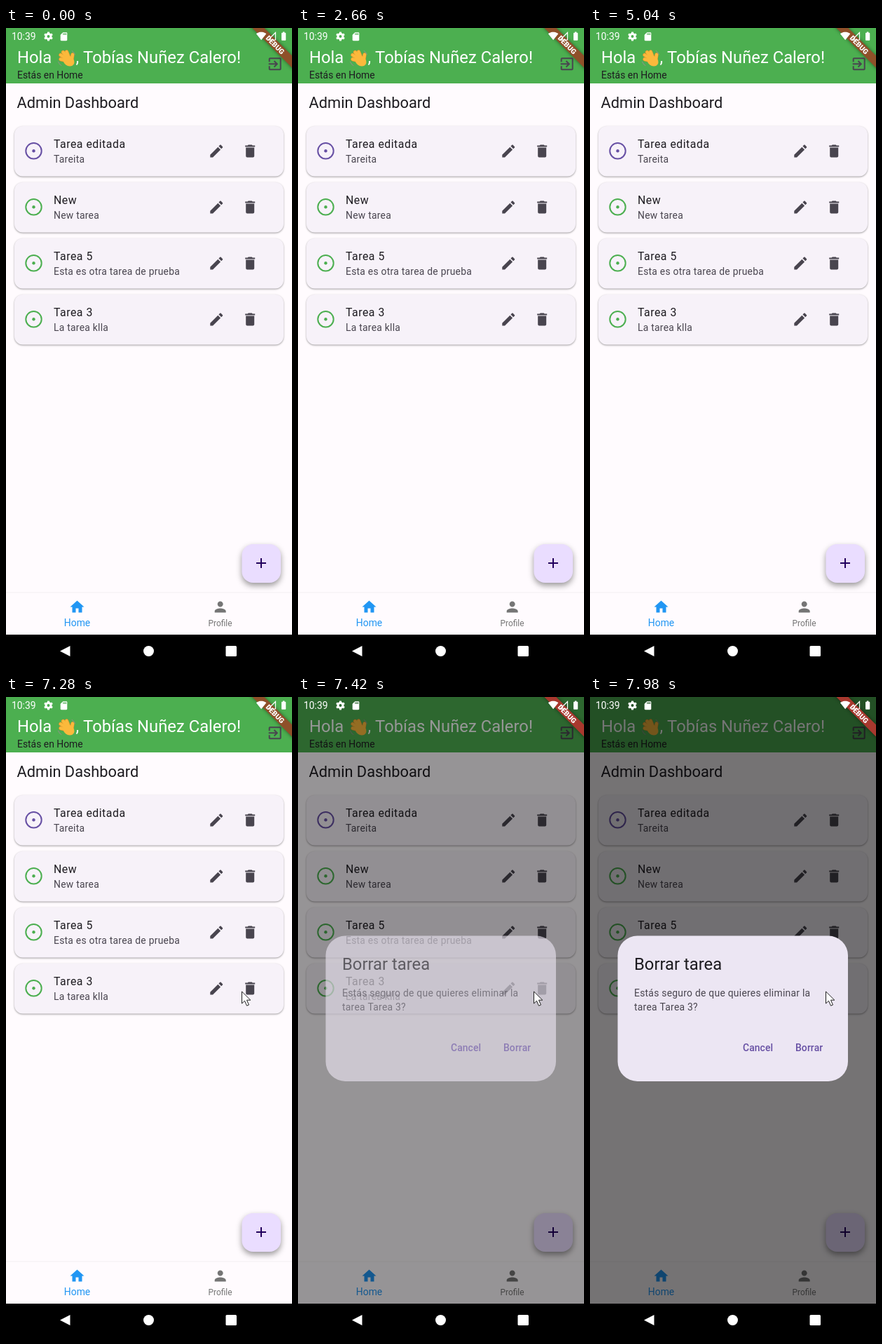
An HTML page with a canvas that plays this animation: 408x914 px, repeating every 8000 ms.

```html
<!DOCTYPE html>
<html lang="es">
<head>
<meta charset="utf-8">
<title>Admin Dashboard</title>
<style>
html, body { margin: 0; width: 100%; height: 100%; overflow: hidden; background: #fffbfe; }
canvas { display: block; width: 408px; height: 914px; }
</style>
</head>
<body>
<canvas id="stage"></canvas>
<script>
const W = 408, H = 914, LOOP = 8000;
const canvas = document.getElementById('stage');
const ctx = canvas.getContext('2d');
const ratio = window.devicePixelRatio || 1;
canvas.width = W * ratio;
canvas.height = H * ratio;

const COLOR = {
  page: '#fffbfe', card: '#f7f2f9', header: '#4caf50', fab: '#eaddff', dialog: '#ece6f3',
  ink: '#1d1b20', soft: '#49454f', purple: '#6750a4', green: '#4caf50', blue: '#2196f3',
  muted: '#757575', white: '#ffffff'
};

const ICON = {
  edit: 'M3 17.25V21h3.75L17.81 9.94l-3.75-3.75L3 17.25zM20.71 7.04c.39-.39.39-1.02 0-1.41l-2.34-2.34c-.39-.39-1.02-.39-1.41 0l-1.83 1.83 3.75 3.75 1.83-1.83z',
  trash: 'M6 19c0 1.1.9 2 2 2h8c1.1 0 2-.9 2-2V7H6v12zM19 4h-3.5l-1-1h-5l-1 1H5v2h14V4z',
  exit: 'M10.09 15.59L11.5 17l5-5-5-5-1.41 1.41L12.67 11H3v2h9.67l-2.58 2.59zM19 3H5c-1.11 0-2 .9-2 2v4h2V5h14v14H5v-4H3v4c0 1.1.89 2 2 2h14c1.1 0 2-.9 2-2V5c0-1.1-.9-2-2-2z',
  home: 'M10 20v-6h4v6h5v-8h3L12 3 2 12h3v8z',
  person: 'M12 12c2.21 0 4-1.79 4-4s-1.79-4-4-4-4 1.79-4 4 1.79 4 4 4zm0 2c-2.67 0-8 1.34-8 4v2h16v-2c0-2.66-5.33-4-8-4z',
  plus: 'M19 13h-6v6h-2v-6H5v-2h6V5h2v6h6v2z',
  card: 'M18 2h-8L4 8v12c0 1.1.9 2 2 2h12c1.1 0 2-.9 2-2V4c0-1.1-.9-2-2-2zM12 8h-2V4h2v4zm3 0h-2V4h2v4zm3 0h-2V4h2v4z',
  wifi: 'M12 21.5L23.6 7C23.2 6.7 18.7 3 12 3S.8 6.7.4 7L12 21.5z',
  battery: 'M15.7 4H14V2h-4v2H8.3C7.6 4 7 4.6 7 5.3v15.4c0 .7.6 1.3 1.3 1.3h7.4c.7 0 1.3-.6 1.3-1.3V5.3c0-.7-.6-1.3-1.3-1.3z',
  pointer: 'M0 0V17L4 13.3L7 20.2L10 19L7 12.2H12.3Z'
};
for (const name in ICON) ICON[name] = new Path2D(ICON[name]);

const TASKS = [
  ['Tarea editada', 'Tareita', COLOR.purple],
  ['New', 'New tarea', COLOR.green],
  ['Tarea 5', 'Esta es otra tarea de prueba', COLOR.green],
  ['Tarea 3', 'La tarea klla', COLOR.green]
];

// Steps of the dialog opening: start time, scrim and dialog opacity
const STEPS = [
  { at: 7350, scrim: .17, alpha: .25 },
  { at: 7420, scrim: .41, alpha: .62 },
  { at: 7540, scrim: .5, alpha: .91 },
  { at: 7610, scrim: .54, alpha: 1 }
];

function text(str, x, y, size, color, { weight = 400, gap = 0, align = 'left' } = {}) {
  ctx.font = `${weight} ${size}px Roboto, sans-serif`;
  ctx.letterSpacing = gap + 'px';
  ctx.textAlign = align;
  ctx.fillStyle = color;
  ctx.fillText(str, x, y);
}

function icon(name, x, y, color, scale = 1) {
  ctx.save();
  ctx.translate(x, y);
  ctx.scale(scale, scale);
  ctx.fillStyle = color;
  ctx.fill(ICON[name]);
  ctx.restore();
}

function rect(x, y, w, h, color) {
  ctx.fillStyle = color;
  ctx.fillRect(x, y, w, h);
}

function roundRect(x, y, w, h, r, color, shadow) {
  ctx.save();
  if (shadow) {
    ctx.shadowColor = shadow.color;
    ctx.shadowBlur = shadow.blur * ratio;
    ctx.shadowOffsetY = shadow.y * ratio;
  }
  ctx.beginPath();
  ctx.roundRect(x, y, w, h, r);
  ctx.fillStyle = color;
  ctx.fill();
  ctx.restore();
}

function disc(x, y, r, color) {
  ctx.beginPath();
  ctx.arc(x, y, r, 0, Math.PI * 2);
  ctx.fillStyle = color;
  ctx.fill();
}

function line(x1, y1, x2, y2, width, color) {
  ctx.beginPath();
  ctx.moveTo(x1, y1);
  ctx.lineTo(x2, y2);
  ctx.lineWidth = width;
  ctx.strokeStyle = color;
  ctx.stroke();
}

function hand() {
  const skin = '#fbb93c', edge = '#e08f28';
  ctx.save();
  ctx.translate(86.5, 43);
  ctx.lineCap = 'round';
  for (const [width, color] of [[5.4, edge], [4.4, skin]]) {
    line(2, 4, -8.5, 1.5, width, color);
    line(2, 2, -8.5, -4.5, width, color);
    line(3, 1, -5, -8.5, width, color);
    line(4, 1, 0, -9, width, color);
    line(7, 4, 8.5, -5, width, color);
  }
  ctx.beginPath();
  ctx.ellipse(3, 4, 8.5, 7, .65, 0, Math.PI * 2);
  ctx.fillStyle = skin;
  ctx.fill();
  for (const side of [0, Math.PI]) {
    ctx.beginPath();
    ctx.arc(0, 0, 13, side + .7 * Math.PI, side + .87 * Math.PI);
    ctx.lineWidth = 1.3;
    ctx.strokeStyle = '#7d9a78';
    ctx.stroke();
  }
  ctx.restore();
}

function header() {
  rect(0, 0, W, 79, COLOR.header);
  text('Hola', 16, 50, 23.8, COLOR.white);
  hand();
  text(', Tobías Nuñez Calero!', 99.5, 50, 23.8, COLOR.white);
  text('Estás en Home', 16, 72, 13.9, COLOR.ink);
  icon('exit', 371.7, 39.3, COLOR.soft);
}

function task([title, note, color], y) {
  roundRect(12, y, 384, 71.5, 12, COLOR.card, { color: 'rgba(0,0,0,.38)', blur: 2.5, y: 1 });
  ctx.beginPath();
  ctx.arc(39.5, y + 35.3, 11.2, 0, Math.PI * 2);
  ctx.lineWidth = 2;
  ctx.strokeStyle = color;
  ctx.stroke();
  disc(39.5, y + 35.3, 2.2, color);
  text(title, 68, y + 30.5, 15.87, COLOR.ink, { gap: .5 });
  text(note, 68, y + 52, 13.9, COLOR.soft, { gap: .25 });
  icon('edit', 288.3, y + 23.5, COLOR.soft);
  icon('trash', 336.2, y + 23.5, COLOR.soft);
}

function page() {
  rect(0, 0, W, H, COLOR.page);
  header();
  text('Admin Dashboard', 15.5, 114.3, 21.8, COLOR.ink);
  TASKS.forEach((item, i) => task(item, 140 + i * 80));
  roundRect(336.5, 736, 55.5, 55, 16, COLOR.fab, { color: 'rgba(0,0,0,.4)', blur: 9, y: 4 });
  icon('plus', 352, 751, '#21005d');
  rect(0, 805, W, 60, COLOR.page);
  rect(0, 804.5, W, 1, '#f3eff3');
  icon('home', 89.5, 813.5, COLOR.blue);
  text('Home', 101.5, 853, 13.9, COLOR.blue, { align: 'center' });
  icon('person', 293.7, 813.5, COLOR.muted);
  text('Profile', 305.5, 853, 11.9, COLOR.muted, { align: 'center' });
}

function dialog(alpha) {
  ctx.save();
  ctx.globalAlpha = alpha;
  roundRect(39.5, 340.5, 328.5, 207.5, 28, COLOR.dialog);
  text('Borrar tarea', 63, 388.5, 23.8, COLOR.ink);
  text('Estás seguro de que quieres eliminar la', 63, 427, 13.9, COLOR.soft, { gap: .25 });
  text('tarea Tarea 3?', 63, 446.8, 13.9, COLOR.soft, { gap: .25 });
  text('Cancel', 218, 505, 13.9, COLOR.purple, { weight: 500, gap: .1 });
  text('Borrar', 293, 505, 13.9, COLOR.purple, { weight: 500, gap: .1 });
  ctx.restore();
}

function banner(color) {
  ctx.save();
  ctx.translate(W, 0);
  ctx.rotate(Math.PI / 4);
  ctx.shadowColor = 'rgba(0,0,0,.45)';
  ctx.shadowBlur = 5 * ratio;
  rect(-44, 28, 88, 12, color);
  ctx.shadowColor = 'transparent';
  text('DEBUG', 0, 37.6, 10.2, COLOR.white, { weight: 900, align: 'center' });
  ctx.restore();
}

function statusBar() {
  const ink = COLOR.white;
  text('10:39', 8, 16.8, 13.9, ink);
  // Gear: toothed ring
  ctx.beginPath();
  ctx.arc(60.5, 12, 3.5, 0, Math.PI * 2);
  ctx.lineWidth = 3;
  ctx.strokeStyle = ink;
  ctx.stroke();
  for (let i = 0; i < 6; i++) {
    const a = i * Math.PI / 3 + Math.PI / 6, c = Math.cos(a), s = Math.sin(a);
    line(60.5 + c * 4, 12 + s * 4, 60.5 + c * 6.4, 12 + s * 6.4, 3, ink);
  }
  icon('card', 75.3, 5, ink, .6);
  icon('wifi', 356.7, 4, ink, .62);
  ctx.beginPath();
  ctx.moveTo(374, 17);
  ctx.lineTo(384.5, 17);
  ctx.lineTo(384.5, 6.5);
  ctx.closePath();
  ctx.lineWidth = 1.2;
  ctx.strokeStyle = ink;
  ctx.stroke();
  icon('battery', 388.7, 4.2, ink, .62);
}

function navBar() {
  const ink = COLOR.white;
  rect(0, 865, W, 49, '#000');
  ctx.beginPath();
  ctx.moveTo(77, 888.5);
  ctx.lineTo(91.5, 881);
  ctx.lineTo(91.5, 896);
  ctx.fillStyle = ink;
  ctx.fill();
  disc(203.5, 888.5, 7.5, ink);
  roundRect(313.5, 881, 15.5, 15, 1.5, ink);
}

function pointer(time) {
  const start = 6900, end = 7220;
  if (time < start) return;
  const left = (1 - Math.min(1, (time - start) / (end - start))) ** 2;
  ctx.save();
  ctx.translate(336.5 + 72 * left, 420 + 40 * left);
  ctx.fillStyle = COLOR.white;
  ctx.fill(ICON.pointer);
  ctx.lineWidth = 1;
  ctx.strokeStyle = '#222';
  ctx.stroke(ICON.pointer);
  ctx.restore();
}

function draw(time) {
  const step = STEPS.filter(s => time >= s.at).pop();
  ctx.setTransform(ratio, 0, 0, ratio, 0, 0);
  page();
  if (step) {
    rect(0, 0, W, 865, `rgba(0,0,0,${step.scrim})`);
    dialog(step.alpha);
  }
  banner(step ? '#a8382e' : '#8f5029');
  statusBar();
  navBar();
  pointer(time);
}

const begin = performance.now();
function tick() {
  draw((performance.now() - begin) % LOOP);
  requestAnimationFrame(tick);
}
tick();
</script>
</body>
</html>
```
